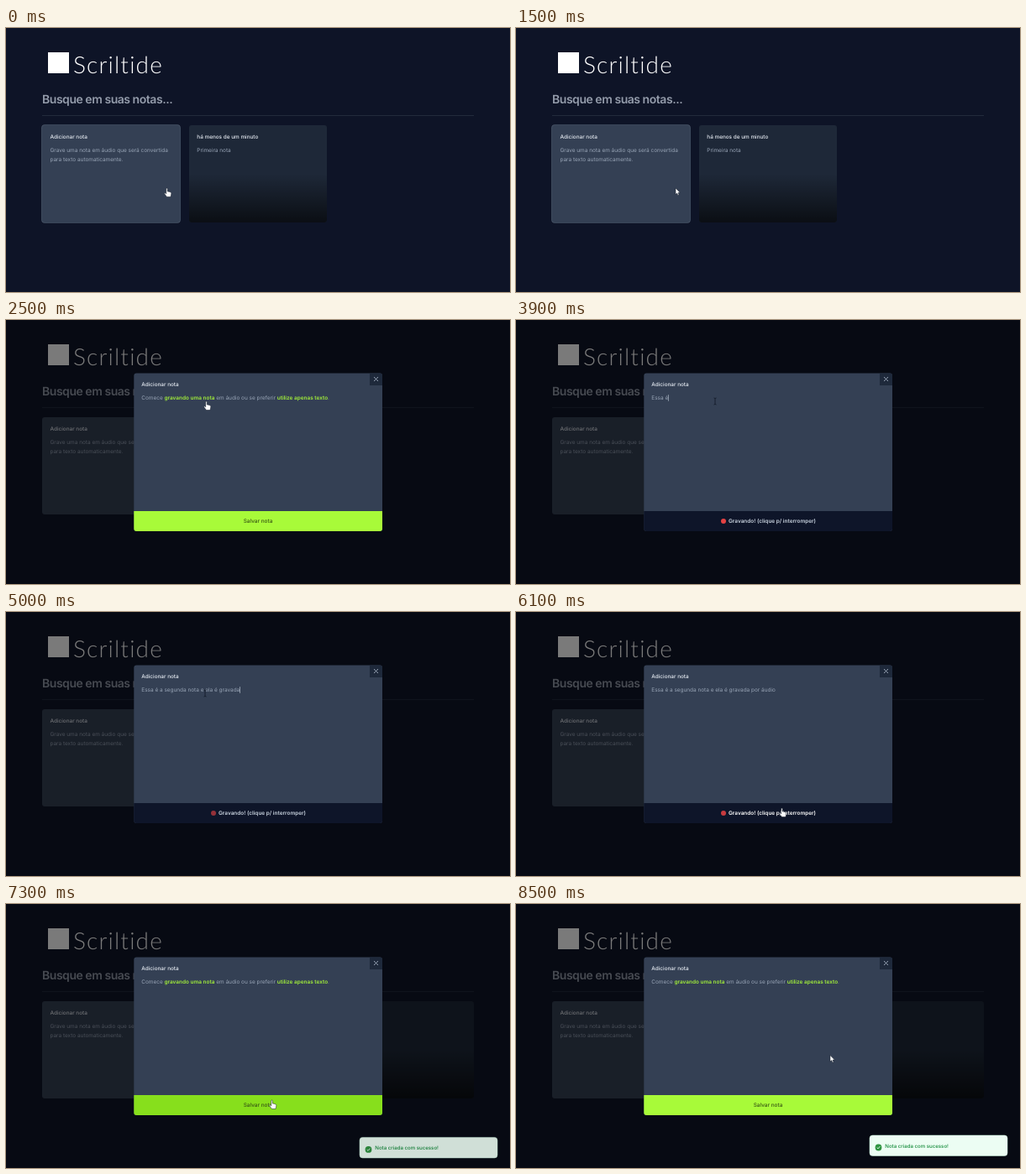
An HTML page for the animation above (8800 ms loop, 600 by 315 pixels).

```html
<!DOCTYPE html>
<html lang="pt-BR">
<head>
<meta charset="utf-8">
<title>Notas</title>
<style>
  html, body { margin: 0; width: 100%; height: 100%; overflow: hidden; background: #0e1427; }
  svg { display: block; width: 100vw; height: 100vh; }
  text { font: 6.45px Inter, sans-serif; fill: #98a4b6; text-rendering: geometricPrecision; }
  .title { font-size: 6.4px; font-weight: 550; fill: #e8edf4; }
  .search { font-size: 14px; font-weight: 600; letter-spacing: -.033em; fill: #949cab; }
  .logo { font: 300 28px Lato, sans-serif; letter-spacing: 1.2px; fill: #fff; }
  .link { font-weight: 600; fill: #a3f03a; }
  .save { font-weight: 500; fill: #365314; text-anchor: middle; }
  .record { font-weight: 600; }
  .success { font-size: 6.1px; font-weight: 500; fill: #128a38; }
</style>
</head>
<body>
<svg viewBox="0 0 600 315">
  <defs>
    <linearGradient id="shade" x2="0" y2="1">
      <stop offset="0" stop-opacity="0"/>
      <stop offset="1" stop-opacity=".65"/>
    </linearGradient>
    <clipPath id="modalShape"><rect x="152.3" y="63.5" width="295.7" height="188.5" rx="3"/></clipPath>
    <g id="note">
      <rect width="164" height="116" rx="3" fill="#1e2838"/>
      <rect y="58" width="164" height="58" rx="3" fill="url(#shade)"/>
    </g>
  </defs>

  <rect width="600" height="315" fill="#0e1427"/>
  <rect x="50" y="29" width="25" height="25" fill="#fff"/>
  <text class="logo" x="80" y="54">Scriltide</text>
  <text class="search" x="43" y="90.3">Busque em suas notas...</text>
  <path d="M43 104.5H557" stroke="#222b3c"/>

  <rect id="ring" x="42.2" y="115.2" width="165.6" height="117.6" rx="4" fill="#4a576a"/>
  <rect x="43" y="116" width="164" height="116" rx="3" fill="#344054"/>
  <text class="title" x="52.5" y="132.3">Adicionar nota</text>
  <text x="52.5" y="148">Grave uma nota em áudio que será convertida</text>
  <text x="52.5" y="159">para texto automaticamente.</text>

  <use href="#note" x="218" y="116"/>
  <text class="title" x="227.3" y="132.3">há menos de um minuto</text>
  <text x="227.3" y="148">Primeira nota</text>
  <use id="olderNote" href="#note" x="393" y="116"/>

  <g id="dialog">
    <rect width="600" height="315" fill-opacity=".52"/>
    <g clip-path="url(#modalShape)">
      <rect x="152" y="63" width="297" height="190" fill="#344054"/>
      <rect x="433" y="63" width="16" height="15" fill="#1e293b"/>
      <path d="M438 68l5 5m0-5l-5 5" stroke="#a3afc0" stroke-width=".9"/>
      <rect id="footer" x="152" y="228" width="297" height="25"/>
    </g>
    <text class="title" x="161.3" y="79.3">Adicionar nota</text>
    <text id="intro" x="161.3" y="95.3">Comece <tspan class="link">gravando uma nota</tspan> em áudio ou se preferir <tspan class="link">utilize apenas texto</tspan>.</text>
    <text id="speech" x="161.3" y="95.3"></text>
    <path id="caret" stroke="#cbd5e1" stroke-width=".6"/>
    <text id="saveLabel" class="save" x="300" y="242.3">Salvar nota</text>
    <g id="recording">
      <circle id="dot" cx="247" cy="240" r="3" fill="#ef4444"/>
      <text id="recordLabel" class="record" x="253" y="242.3">Gravando! (clique p/ interromper)</text>
    </g>
  </g>

  <g id="toast">
    <rect x="421" y="276" width="164" height="24.5" rx="3.5" fill="#ecfdf3" stroke="#d3fde5" stroke-width=".5"/>
    <circle cx="431.5" cy="290.5" r="3.9" fill="#2f9440"/>
    <path d="M429.7 290.6l1.3 1.3 2.4-2.7" fill="none" stroke="#ecfdf3" stroke-width=".9"/>
    <text class="success" x="439.3" y="290.8">Nota criada com sucesso!</text>
  </g>

  <g id="cursor">
    <path id="arrow" d="M0 0V7.6L1.7 6.1 2.8 8.7 4.1 8.1 3 5.6H5.4Z" fill="#fff" stroke="#111827" stroke-width=".5"/>
    <path id="hand" d="M.7 1Q.8 0 1.5 0T2.3 1V4L3.5 4.2 4.8 4.5 6 5Q7 5.3 6.8 6.8L6 10.5H1.5L-1.2 7Q-1.8 5.8-.7 5.8L.7 6.8Z" fill="#fff" stroke="#111827" stroke-width=".5"/>
    <path id="beam" d="M-1.5-4Q0-4 0-3Q0-4 1.5-4M0-3V3M-1.5 4Q0 4 0 3Q0 4 1.5 4" fill="none" stroke="#111827" stroke-width=".8"/>
  </g>
</svg>
<script>
const LOOP = 8800;
const OPEN = 1600, RECORD = 2700, BLUR = 5900, STOP = 6200, SAVE = 7100;

// Recognised words with the moment each one appears
const words = [
  ['Essa', 3500], ['é', 3800], ['a', 4000], ['segunda', 4100], ['nota', 4300], ['e', 4500],
  ['ela', 4600], ['é', 4800], ['gravada', 5000], ['por', 5200], ['áudio', 5400]
];

// Pointer moves: start, end, target x, target y
const moves = [[1800, 2400, 237, 97], [5100, 5700, 315, 234], [8000, 8500, 374, 180.5]];

const el = Object.fromEntries([...document.querySelectorAll('svg [id]')].map(e => [e.id, e]));
const show = (name, on) => el[name].style.display = on ? '' : 'none';
const progress = (t, from, to) => Math.min(1, Math.max(0, (t - from) / (to - from)));
const smooth = p => p * p * (3 - 2 * p);

function pointerAt(t) {
  let x = 190, y = 191;
  for (const [from, to, toX, toY] of moves) {
    const p = smooth(progress(t, from, to));
    x += (toX - x) * p;
    y += (toY - y) * p;
  }
  return [x, y];
}

function cursorKind(t, x, y, overFooter) {
  if (t < 1500 || overFooter) return 'hand';
  if (t >= RECORD && t < SAVE) return 'beam';
  const overLink = t >= OPEN && t < RECORD && x > 189 && x < 248 && y < 98;
  return overLink ? 'hand' : 'arrow';
}

function draw(t) {
  const recording = t >= RECORD && t < STOP;
  const editing = t >= RECORD && t < SAVE;
  const [x, y] = pointerAt(t);
  const overFooter = t >= OPEN && y > 228 && y < 252;

  show('ring', t < OPEN);
  show('dialog', t >= OPEN);
  show('olderNote', t >= SAVE);
  show('intro', !editing);
  show('speech', editing);
  show('recording', recording);
  show('saveLabel', !recording);

  el.footer.setAttribute('fill', recording ? '#0e1529' : overFooter ? '#87df1c' : '#a8fa39');
  el.recordLabel.style.fill = overFooter ? '#fff' : '#cbd5e1';
  el.dot.setAttribute('opacity', .75 + .25 * Math.cos((t - 3700) * Math.PI / 1000));

  el.speech.textContent = words.filter(w => t >= w[1]).map(w => w[0]).join(' ');
  const caretOn = editing && t < BLUR && (t - RECORD) % 1000 < 500;
  show('caret', caretOn);
  if (caretOn) {
    const end = 161.6 + el.speech.getComputedTextLength();
    el.caret.setAttribute('d', `M${end} 89.2V96.8`);
  }

  const rise = 1 - (1 - progress(t, SAVE, SAVE + 400)) ** 3;
  show('toast', t >= SAVE);
  el.toast.setAttribute('opacity', rise);
  el.toast.setAttribute('transform', `translate(0 ${20 * (1 - rise)})`);

  const kind = cursorKind(t, x, y, overFooter);
  for (const name of ['arrow', 'hand', 'beam']) show(name, name === kind);
  el.cursor.setAttribute('transform', `translate(${x} ${y})`);
}

const start = performance.now();
function tick() {
  draw((performance.now() - start) % LOOP);
  requestAnimationFrame(tick);
}
tick();
</script>
</body>
</html>
```
